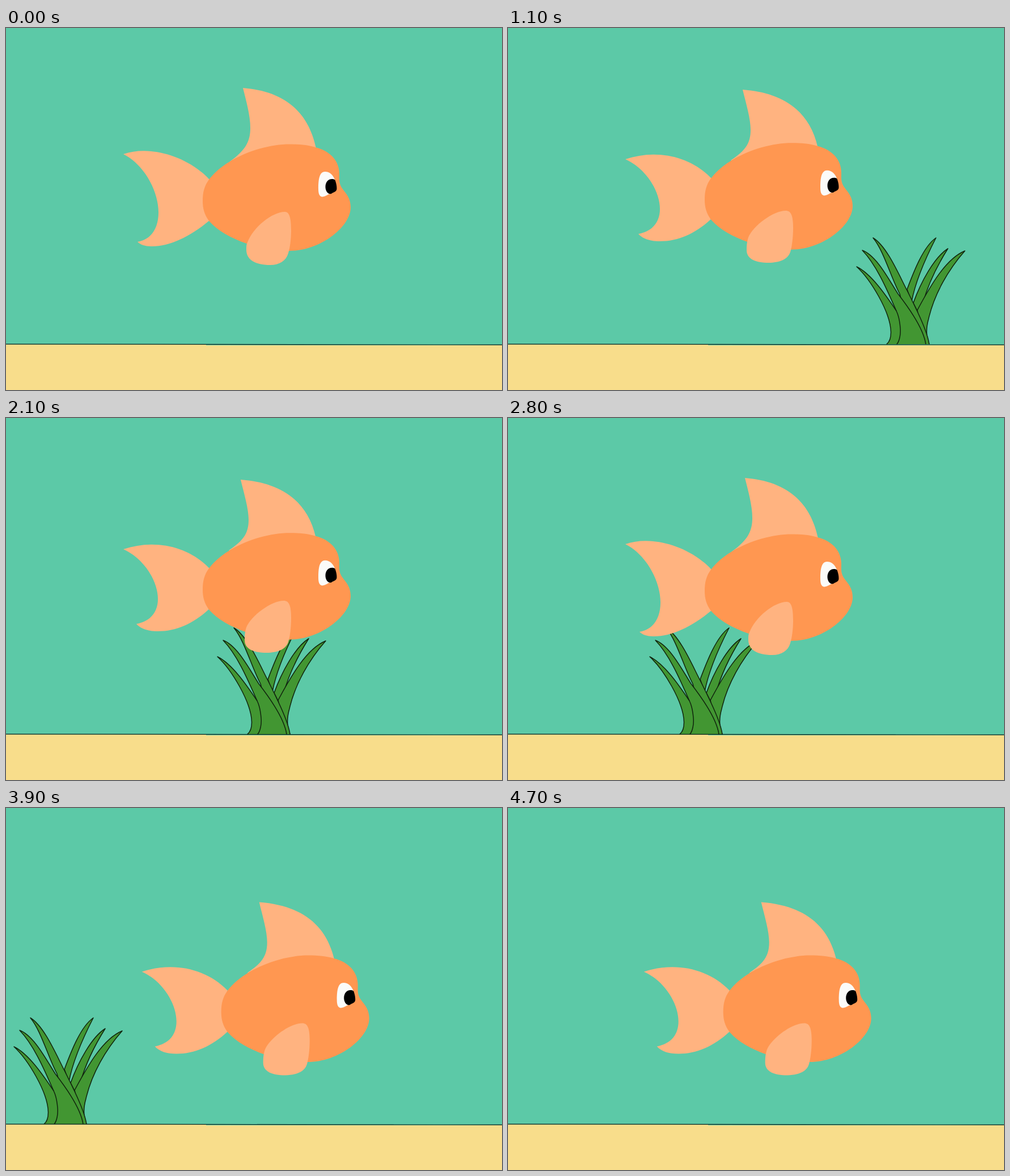
An HTML page for the animation above (4.8 s loop, 875 by 640 pixels).

```html
<!DOCTYPE html>
<html lang="en">
<head>
<meta charset="utf-8">
<title>Goldfish</title>
<style>
  html, body { margin: 0; width: 100%; height: 100%; overflow: hidden; background: #5cc9a7; }
  svg { display: block; width: 875px; height: 640px; }
  .fin { fill: #ffb380; }
  .body { fill: #ff9751; }
  #plant path { fill: #429632; stroke: #10240d; stroke-width: 1.5; stroke-linejoin: round; }
</style>
</head>
<body>
<svg viewBox="0 0 875 640">
  <defs>
    <clipPath id="water"><rect width="875" height="559"/></clipPath>
    <g id="core">
      <path class="body" d="M347 306C347 290 350 279 358 268C368 255 380 245 395 236C428 216 468 205.5 500 205.5C518 205.5 533 207 546 211C572 217.5 588 235 588 258C588 264 587.5 270 589 275C592 288 608 294 608 317C608 352 554 394 500 394C474 394 450 391 424 381C396 371 374 359 358 341C350 330 347 319 347 306Z"/>
      <path fill="#fbfbf9" d="M563 254C571 254 577 260 580 268L575 292C569 293 564 298 558 298.5C552 298 551 291 551 284C551 267 553 254 563 254Z"/>
      <path d="M575 267C579 267 580.5 268 581 270C583 276 583.5 280 583.5 284C583.5 290 577 290 574 293C568 295 563.5 288 563.5 281C563.5 273 568 267 575 267Z"/>
    </g>
  </defs>
  <rect width="875" height="640" fill="#5cc9a7"/>
  <path fill="#f8dd8b" d="M0 559.5H353V561H875V640H0Z"/>
  <g clip-path="url(#water)">
    <g id="plant">
      <path d="M755 371C733 386 716 430 704 462L712 484C718 452 734 412 755 371Z"/>
      <path d="M776 390C752 405 728 450 715 486L722 500L732 486C740 457 756 422 776 390Z"/>
      <path d="M806 394C772 408 745 456 722 499L736 562H744L743 559C737 545 738 528 742 514C752 470 777 427 806 394Z"/>
      <path d="M644 371C663 394 675 440 691 470L715 562H743V559C740 537 722 500 704 464C690 437 668 385 644 371Z"/>
      <path d="M625 393C651 420 670 466 685 500L680 562H737V559C733 530 705 492 688 470C672 445 650 402 625 393Z"/>
      <path d="M615 422C639 444 675 502 675.5 538C675.5 548 673 555 668 559V562H686V559C691 553 693 540 692 530C691 518 689 508 685 500C665 470 640 434 615 422Z"/>
    </g>
  </g>
  <path d="M0 558.8L875 560.2" stroke="#10231c" stroke-width="1.2"/>
  <g id="fish">
    <g>
      <path class="fin" d="M207 223C256 206 323 229 358 267L380 304L358 341C325 369 288 386 258 386C246 386 238 384 232 378C257 374 269 353 269 326C269 290 245 242 207 223Z"/>
      <path class="fin" d="M418 106C482 111 532 140 547 213L500 260L395 236C423 216 431 200 431 177C431 155 424 130 418 106Z"/>
      <use href="#core"/>
      <path class="fin" d="M492 325C500 325 503 336 503 358C503 374 501 388 498 398C494 412 482 419 466 419C440 419 424 410 424 392C424 386 424 382 426 379C436 352 470 325 492 325Z"/>
    </g>
    <g>
      <path class="fin" d="M207 232C262 214 320 226 358 265L380 302L358 338C330 364 300 377 268 377C251 377 238 373 230 364C256 359 268 342 268 320C268 288 243 248 207 232Z"/>
      <path class="fin" d="M414 109C480 114 531 142 546.5 211L500 258L393 234C420 216 428 203 428 180C428 160 420 134 414 109Z"/>
      <use href="#core" y="-2.3"/>
      <path class="fin" d="M490 323C499 323 503 331 503 354C503 370 501 386 498 396C494 409 478 415 460 415C436 415 421 408 421 393C421 386 421 380 424 370C432 350 468 323 490 323Z"/>
    </g>
  </g>
</svg>
<script>
  const STEP = 100, STEPS = 48, DROP = 37;
  // [step, x of the plant's left tip]
  const drift = [[0, 884], [11, 615], [12, 580.5], [18, 446.5], [21, 373], [28, 250], [35, 113], [36, 89], [39, 14], [47, -194]];
  const plant = document.getElementById('plant');
  const fish = document.getElementById('fish');
  const poses = [...fish.children];

  function plantX(n) {
    const k = Math.max(1, drift.findIndex(([s]) => s >= n));
    const [s0, x0] = drift[k - 1], [s1, x1] = drift[k];
    return x0 + (x1 - x0) * (n - s0) / (s1 - s0);
  }

  function draw(n) {
    plant.setAttribute('transform', `translate(${plantX(n) - 615} 0)`);
    fish.setAttribute('transform', n < DROP ? '' : 'translate(32.7 57.4)');
    poses.forEach((pose, i) => pose.style.display = n % 2 === i ? '' : 'none');
  }

  const start = performance.now();
  function tick() {
    draw(Math.floor((performance.now() - start) / STEP) % STEPS);
    requestAnimationFrame(tick);
  }
  tick();
</script>
</body>
</html>
```
